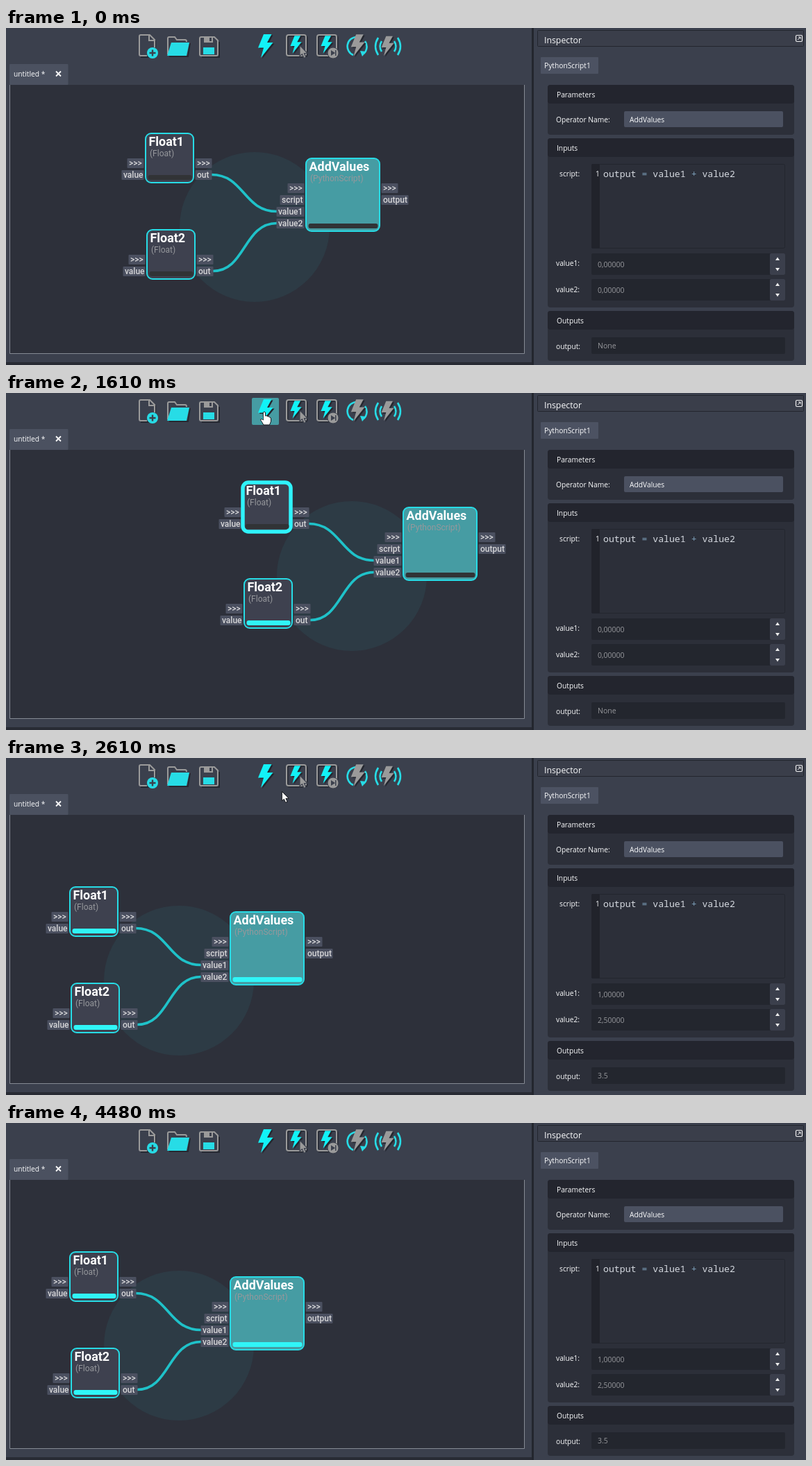
These frames come from a looping animation (1152 by 486 pixels, 5.08 s). An HTML page:

```html
<!DOCTYPE html>
<html lang="en">
<head>
<meta charset="utf-8">
<title>Node editor</title>
<style>
html, body { margin: 0; width: 100%; height: 100%; overflow: hidden; background: #3b404d; }
svg { display: block; }
text { font: 500 10.25px "Open Sans", "Noto Sans", sans-serif; fill: #fafbfc; white-space: pre; }
#graph text { font-family: Roboto, sans-serif; }
#graph .title { font-size: 17.9px; font-weight: 600; fill: #fff; }
#graph .kind { font-size: 12px; font-weight: 400; fill: #96989c; }
#graph .port { font-size: 12px; font-weight: 500; fill: #d6d6d8; }
.code { font: 13.2px "Noto Sans Mono", monospace; fill: #d5d9e0; }
.op { fill: #7fa3bd; }
text.dim { font-size: 10.5px; font-weight: 400; fill: #97989c; }
.grey { fill: none; stroke: #9a9a9a; stroke-width: 2; }
.cyan { fill: none; stroke: #27dce6; stroke-width: 2.6; }
.dark { fill: none; stroke: #262932; stroke-width: 2; }
</style>
</head>
<body>
<svg width="1152" height="486" viewBox="0 0 1152 486">
  <defs>
    <clipPath id="view"><rect x="6" y="82" width="740" height="387"/></clipPath>
    <path id="bolt" d="M-2-17H9.500L3-5H11.500L-6 17L-2 2.500H-10Z"/>
    <path id="arrow" d="M0 0V13.500L3 11L5.300 16L7.800 15L5.600 10H9.800Z"/>
    <path id="hand" d="M-1.700 1Q0-1 1.600 1V6Q4 5 4.800 7Q7 6 7.500 8Q9.500 8 9.500 10V14L7.500 19H-1L-5 12.500Q-5.500 10-3.500 10.500L-1.700 12Z"/>
  </defs>
  <g id="shell"></g>
  <rect id="button" x="354" y="7" width="39" height="39" rx="2"/>
  <g id="icons"></g>
  <g clip-path="url(#view)"><g id="graph"></g></g>
  <path d="M5.500 82V469.500H746.500V82" fill="none" stroke="#858a94"/>
  <g id="panel"></g>
  <circle id="ring" r="12" fill="#fff" fill-opacity=".2" stroke="#fff" stroke-opacity=".6"/>
  <use id="cursor" fill="#fff" stroke="#15171c" stroke-width="1"/>
</svg>
<script>
const LOOP = 5080, FRAME = 66.84;
const $ = id => document.getElementById(id);
const rect = (x, y, w, h, fill, rx = 0, more = '') =>
  `<rect x="${x}" y="${y}" width="${w}" height="${h}" rx="${rx}" fill="${fill}" ${more}/>`;
const text = (x, y, s, cls = '', more = '') =>
  `<text x="${x}" y="${y}" class="${cls}" ${more}>${s}</text>`;
const line = (d, cls) => `<path d="${d}" class="${cls}"/>`;

// Window and toolbar
$('shell').innerHTML =
  rect(5, 52, 84.5, 30, '#4b5160', 1) + text(11, 70, 'untitled *') +
  '<path d="M72 62.500l7 7m0-7l-7 7" stroke="#fff" stroke-width="1.800"/>' +
  rect(6, 82, 740, 387, '#2d303a') +
  rect(0, 482, 758, 4, '#282b34') + rect(757, 0, 3, 486, '#23262e');

const bolt = (x, y, fill, scale = 1) =>
  `<use href="#bolt" transform="translate(${x + 2},${y + 1.5}) scale(${scale})" fill="#24272f"/>
   <use href="#bolt" transform="translate(${x},${y}) scale(${scale})" fill="${fill}"/>`;
const frame = x => rect(x + 1.5, 11.5, 28, 30, 'none', 3, 'class="dark"') +
  rect(x, 10, 28, 30, 'none', 3, 'class="grey"');
const CYAN = '#12f2f7', GREY = '#9a9a9a';

$('icons').innerHTML =
  line('M194 42H206M215 18V28', 'dark') +
  line('M203 40H194Q192 40 192 38V12Q192 10 194 10H207L214 17V28M206 10V18H214', 'grey') +
  '<circle cx="211" cy="36" r="8" fill="#27dce6"/>' +
  '<path d="M211 31.500v9m-4.500-4.500h9" stroke="#3b404d" stroke-width="2.400"/>' +
  line('M235 41H262L265 22', 'dark') +
  line('M233 38V15Q233 13 235 13H243L246 17H258Q260 17 260 20', 'grey') +
  '<path d="M238 21H264L260 40H232Z" fill="#27dce6"/>' +
  line('M282 42H307V20', 'dark') +
  line('M281 13H300L305 18V38Q305 40 303 40H281Q279 40 279 38V15Q279 13 281 13Z', 'grey') +
  rect(285, 13, 13, 8, GREY) + rect(293, 14, 3, 5, '#3b404d') + rect(284, 28, 16, 10, '#27dce6') +
  bolt(373, 26, CYAN) +
  frame(404) + bolt(417, 24, CYAN, .75) +
  '<use href="#arrow" transform="translate(423,25) scale(1.150)" fill="#9a9a9a" stroke="#3b404d"/>' +
  frame(448) + bolt(461, 24, CYAN, .75) +
  `<circle cx="471" cy="36" r="8" fill="${GREY}" stroke="#3b404d"/>` +
  '<path d="M468 32V40L474 36ZM474 32h1.500v8h-1.500Z" fill="#3b404d"/>' +
  line('M500 39A13.500 13.500 0 0 1 505 13M517 19A13.500 13.500 0 0 1 515 37', 'cyan') +
  '<path d="M510 33l9 1-6 7Z" fill="#27dce6"/>' +
  bolt(506, 25, GREY, .92) +
  bolt(549, 26, GREY, .84) +
  line('M541 19Q536 26.500 541 34M536 14Q528 26.500 536 39M559 19Q564 26.500 559 34M564 14Q572 26.500 564 39', 'cyan');

// Inspector
const group = (y, h, name) => rect(780, y, 355, h, '#2c2f39', 4) +
  rect(780, y, 355, 27, '#23252e', 4) + text(793, y + 17.5, name);
const field = (y, h, w = 279) => rect(843, y, w, h, '#23262e', 2);
const spinner = y => field(y, 31) + rect(1100, y, 22, 31, '#3b3f4c', 2) +
  `<path d="M1108 ${y + 10}h6l-3-4.500ZM1108 ${y + 21}h6l-3 4.500Z" fill="#eee"/>`;
$('panel').innerHTML =
  rect(765.5, 3.5, 383, 23, '#3a3e4a', 1, 'stroke="#23262e"') +
  text(775, 22, 'Inspector', '', 'style="font-size:12.300px"') +
  rect(1137.5, 10.5, 9, 9, 'none', 1.5, 'stroke="#eee" stroke-width="1.200"') +
  '<path d="M1140 17l4-4m-3 0h3v3" fill="none" stroke="#eee"/>' +
  rect(770, 42, 83, 24, '#4c5262', 1) + text(775, 58, 'PythonScript1') +
  group(82, 72, 'Parameters') + text(792, 136, 'Operator Name:') +
  rect(890, 120, 229, 23, '#4b5161', 2) + text(898, 135.5, 'AddValues') +
  group(159, 244, 'Inputs') + text(797, 213.5, 'script:') +
  rect(843.5, 196.5, 278, 121, '#2c2f39', 2, 'stroke="#23262e"') + rect(843, 196, 12, 122, '#21232b', 2) +
  text(849, 213.5, '1') +
  text(860, 215, 'output <tspan class="op">=</tspan> value1 <tspan class="op">+</tspan> value2', 'code') +
  text(792, 343, 'value1:') + spinner(325) + text(792, 380.5, 'value2:') + spinner(362) +
  group(408, 72, 'Outputs') + text(792, 463, 'output:') + field(446, 24) +
  ['v1', 'v2', 'sum'].map((id, i) => text(852, [345, 382, 462][i], '', 'dim', `id="${id}"`)).join('');

// Graph: nodes in order of execution
const nodes = [
  { x: 203, y: 291, w: 69, h: 71, name: 'Float2', kind: 'Float', ins: [['value', 32]], out: ['out', 24] },
  { x: 201, y: 152, w: 69, h: 71, name: 'Float1', kind: 'Float', ins: [['value', 32]], out: ['out', 24] },
  { x: 432, y: 188, w: 106, h: 105, name: 'AddValues', kind: 'PythonScript', fill: '#469ca3',
    ins: [['script', 35], ['value1', 40], ['value2', 40]], out: ['output', 39] }
];
const port = (x, y, w, s) => rect(x, y, w, 14, '#4b5060', 1) + text(x + 2.5, y + 11, s, 'port');
const chevrons = '&gt;&gt;&gt;';

function drawNode(n, active, lit) {
  const { x, y, w, h } = n;
  const left = [[chevrons, 24], ...n.ins], right = [[chevrons, 24], n.out];
  return left.map(([s, pw], i) => port(x - 2.5 - pw, y + 36 + 17 * i, pw, s)).join('') +
    right.map(([s, pw], i) => port(x + w + 2.5, y + 36 + 17 * i, pw, s)).join('') +
    rect(x, y, w, h, n.fill || '#3e414f', 8,
      `stroke="${active ? '#2ff3fb' : '#27dce6'}" stroke-width="${active ? 5.5 : 2}"`) +
    rect(x + 3.5, y + h - 11, w - 6, 7, lit ? '#30f5f7' : '#313336', 3) +
    text(x + 4.5, y + 17.5, n.name, 'title') + text(x + 6, y + 33, `(${n.kind})`, 'kind');
}
const wire = (x, y, y2) =>
  `<path d="M${x} ${y}C${x + 47} ${y} 342 ${y2} 390 ${y2}" fill="none" stroke="#1fc2c9" stroke-width="3.600"/>`;

// Time, view offset, running node, finished nodes
const steps = [
  [0, 0, 0, -1, 0],
  [1470, 98, -36, 0, 0],
  [1540, 140, -51, -1, 1],
  [1610, 140, -23, 1, 1],
  [1670, 141, 40, 1, 1],
  [1740, 141, 87, -1, 2],
  [1810, 91, 76, 2, 2],
  [1870, -20, 53, 2, 2],
  [1940, -109, 34, -1, 3]
];
let shown;
function drawGraph(t) {
  const step = steps.filter(s => s[0] <= t).pop();
  if (step === shown) return;
  shown = step;
  const [, dx, dy, active, done] = step;
  $('graph').setAttribute('transform', `translate(${dx},${dy})`);
  $('graph').innerHTML = '<circle cx="358" cy="287" r="108" fill="#2d3b45"/>' +
    wire(296, 211.5, 264.5) + wire(298, 350.5, 281.5) +
    nodes.map((n, i) => drawNode(n, i === active, i < done)).join('');
  const full = done === 3;
  $('v1').textContent = full ? '1,00000' : '0,00000';
  $('v2').textContent = full ? '2,50000' : '0,00000';
  $('sum').textContent = full ? '3.5' : 'None';
}

// Pointer: start, end, from, to
const moves = [
  [140, 465, 349, 31, 372, 27],
  [2470, 3008, 372, 27, 852, 430],
  [3075, 3076, 857, 450, 857, 450],
  [4080, 4480, 857, 450, 1125, 480]
];
function pointer(t) {
  if (t < 140 || t >= 4480) return null;
  const [a, b, x, y, x2, y2] = moves.filter(m => m[0] <= t).pop();
  const tick = Math.floor((t - 5) / FRAME) * FRAME + 5;
  const p = Math.min(1, Math.max(0, (tick - a) / (b - a)));
  const e = p * p * (3 - 2 * p);
  return [x + (x2 - x) * e, y + (y2 - y) * e];
}

function draw(t) {
  drawGraph(t);
  const at = pointer(t), cursor = $('cursor'), ring = $('ring');
  const over = at && at[0] > 354 && at[0] < 393 && at[1] < 46;
  cursor.style.display = at ? '' : 'none';
  if (at) {
    cursor.setAttribute('href', over ? '#hand' : '#arrow');
    cursor.setAttribute('transform', `translate(${at})`);
    ring.setAttribute('transform', `translate(${at})`);
  }
  const click = t >= 880 && t < 940 || t >= 3750 && t < 3810;
  ring.style.display = click ? '' : 'none';
  $('button').setAttribute('fill', t >= 940 && t < 1940 ? '#469ca3' : over ? '#4b5161' : 'none');
}

const start = performance.now();
function tick() {
  draw((performance.now() - start) % LOOP);
  requestAnimationFrame(tick);
}
tick();
</script>
</body>
</html>
```
